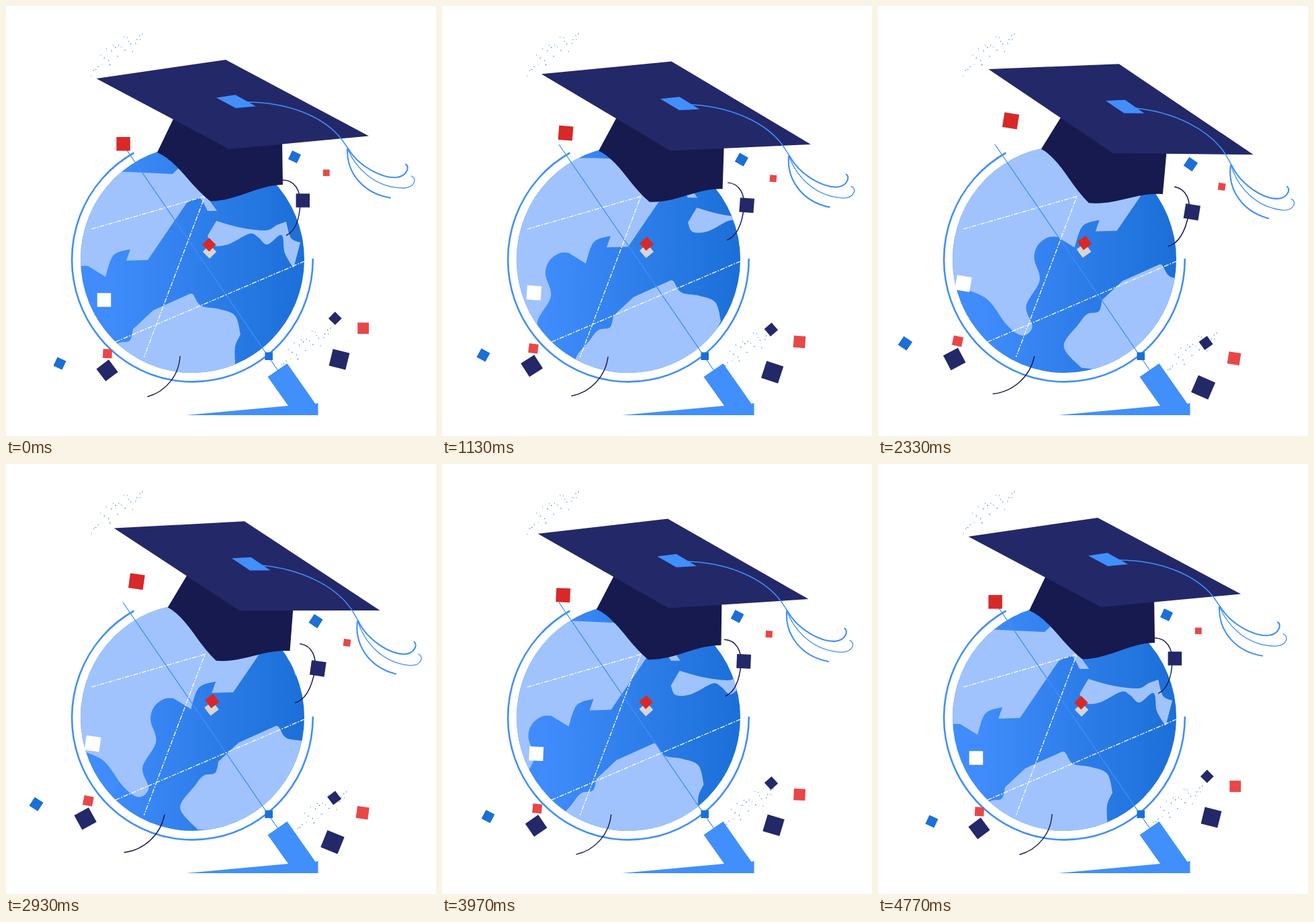
Animation, 640 px wide and 640 px high, one loop 4810 ms. Source, as an HTML page:

```html
<!DOCTYPE html>
<html lang="en">
<head>
<meta charset="utf-8">
<title>Globe with graduation cap</title>
<style>
  html, body { margin: 0; width: 100%; height: 100%; overflow: hidden; background: #fff; }
  svg { display: block; width: 100vw; height: 100vh; }
</style>
</head>
<body>
<svg viewBox="0 0 640 640" xmlns="http://www.w3.org/2000/svg">
  <defs>
    <linearGradient id="sea" gradientUnits="userSpaceOnUse" x1="150" y1="0" x2="444" y2="0">
      <stop offset="0" stop-color="#408cfc"/>
      <stop offset="1" stop-color="#1b6fd7"/>
    </linearGradient>
    <clipPath id="ball"><ellipse cx="277.5" cy="377.3" rx="166.5" ry="168.8"/></clipPath>
  </defs>

  <g id="specks" fill="#2a78dc"></g>

  <!-- globe -->
  <ellipse cx="277.5" cy="377.3" rx="166.5" ry="168.8" fill="url(#sea)"/>
  <g clip-path="url(#ball)"><g id="land" fill="#a0c3fd"></g></g>

  <!-- stand -->
  <path d="M190.5 218.5A179.3 181.8 0 1 0 456.7 376" fill="none" stroke="#418ffb" stroke-width="2.6"/>
  <path d="M389.5 552L418.5 532L460.5 592L464.5 591V609H268L420 595Z" fill="#418ffb"/>
  <path d="M174 206L405 543" stroke="#418ffb" stroke-width="1.3"/>
  <rect x="385.4" y="515.4" width="11.6" height="11.6" fill="#1b6fd7"/>
  <path d="M127 332L296 283.3L205.5 522.5M163 500L444 380" fill="none" stroke="#fff"
    stroke-width="1.3" stroke-dasharray="7 2 2 2"/>

  <g id="drift" fill="#2a78dc"></g>

  <!-- cap -->
  <g id="cap">
    <path d="M251 164L225 218Q243 225 267 253Q288 278 304 290.5C345 290 372 267 412 266L411 200Z" fill="#161a4e"/>
    <path d="M134.5 108L327 80L540 193.5L332 213Z" fill="#232869"/>
    <path d="M313 136.5L341.5 132.2L372 149.2L342 152Z" fill="#418ffb"/>
    <g fill="none" stroke="#418ffb" stroke-linecap="round">
      <path d="M350 143C418 141 474 165 500 199L509 212" stroke-width="1.5"/>
      <path d="M508 213C507 249 532 279 572 285.5" stroke-width="2.1"/>
      <path d="M509 212C525 239 560 257 582 255C597 253 601 239 595 235.5" stroke-width="2.1"/>
      <path d="M508 212C520 240 548 271 592 271C609 270 612 256 603 253" stroke-width="1.3"/>
    </g>
  </g>

  <g id="confetti">
    <g fill="none" stroke="#161a4e" stroke-width="1.4">
      <path d="M412 259C430 259 438 275 438 293C437 316 431 335 417 341.5"/>
      <path d="M259 521A66 66 0 0 1 210.5 581.5"/>
    </g>
  </g>
</svg>
<script>
const LOOP = 4810;
const DRIFT_PEAK = 2925;
const NAVY = '#232869', BLUE = '#1b6fd7', RED = '#d92828', CORAL = '#e94747';
const $ = id => document.getElementById(id);

function add(parent, tag, attrs) {
  const el = document.createElementNS('http://www.w3.org/2000/svg', tag);
  for (const k in attrs) el.setAttribute(k, attrs[k]);
  $(parent).appendChild(el);
}

// Smooth curve through points written as 'x,y x,y ...'
function curve(run) {
  const pts = run.split(' ').map(s => s.split(',').map(Number));
  const at = i => pts[Math.max(0, Math.min(pts.length - 1, i))];
  let d = pts[0].join(' ');
  for (let i = 1; i < pts.length; i++) {
    const [a, b, c, e] = [at(i - 2), at(i - 1), at(i), at(i + 1)];
    const c1 = b.map((v, k) => v + (c[k] - a[k]) / 6);
    const c2 = c.map((v, k) => v - (e[k] - b[k]) / 6);
    d += 'C' + [...c1, ...c2, ...c].join(' ');
  }
  return d;
}

// Smooth runs joined by sharp corners
const shore = (...runs) => add('land', 'path', { d: 'M' + runs.map(curve).join('L') + 'Z' });

shore('-90,246', '160,246', '248,250', '300,200', '320,250', '304,291', '314,305',
  '300,305 288,286 269,293', '211,378', '179,379', '185,362 160,371 148,403',
  '122,387 108,388 93,400 88,420 96,452 76,490 85,521 70,534 47,518 18,480 -20,463', '-90,440');
shore('158,582 132,550 154,517 167,502 184,498 189,481', '189,481 203,468 219,453',
  '270,430 278,429 290,446 317,451 341,461 349,489', '349,489 341,507 341,530', '341,600');
shore('313,320', '300,342 307,356 330,355 362,339 375,344 389,355 410,341 415,368 428,390',
  '438,352 424,345 417,321', '417,321 403,326 387,334 350,330 313,320');

// Squares of one kind, placed at each [x, y]
function squares(fill, size, turn, ...spots) {
  for (const [x, y] of spots) add('confetti', 'rect', {
    x: -size / 2, y: -size / 2, width: size, height: size, fill,
    transform: `translate(${x} ${y}) rotate(${turn})`
  });
}

squares('#d6d6d6', 14.4, 45, [303, 365.8]);
squares(RED, 14.4, 45, [302.3, 355.2]);
squares(RED, 20.5, 0, [174.6, 205.2]);
squares('#fff', 20.5, 0, [146, 437.5]);
squares(NAVY, 20.5, 0, [441.8, 289.5]);
squares(NAVY, 14, 45, [489.8, 464.9]);
squares(NAVY, 25.5, 14, [496, 526]);
squares(NAVY, 23, -37, [150.6, 542.4]);
squares(BLUE, 14.3, 25, [429.5, 224.6], [80, 532]);
squares(CORAL, 9.8, 0, [476.8, 248.3]);
squares(CORAL, 16.8, 0, [531.7, 479.7]);
squares(CORAL, 13.5, 3, [151, 517.3]);

// Two equal sprays of dots along a rising diagonal
let seed = 7;
const rand = () => (seed = seed * 16807 % 2147483647) / 2147483647;
const DOTS = 27;
for (let i = 0; i < DOTS; i++) {
  const u = (i + rand()) / DOTS;
  const dot = { cx: 127 + 78 * u, cy: 90 - 46 * u + 34 * (rand() - 0.5), r: 0.5 + 0.35 * rand() };
  add('specks', 'circle', dot);
  add('drift', 'circle', dot);
}

const ease = u => u * u * (3 - 2 * u);

// 0 at the loop ends, 1 at the peak
const swing = (t, peak) => ease(t < peak ? t / peak : (LOOP - t) / (LOOP - peak));

const move = (id, value) => $(id).setAttribute('transform', value);

function draw(t) {
  const p = swing(t, LOOP / 2);
  const d = swing(t, DRIFT_PEAK);
  move('land', `translate(${145 * p} ${-43.5 * p})`);
  move('cap', `rotate(${6 * p} 283 386.7)`);
  move('confetti', `translate(306.4 386.8) rotate(${9.25 * p}) scale(${1 + 0.078 * p}) translate(-306.4 -386.8)`);
  move('drift', `translate(${279.7 + 24 * d} ${438 + 8.5 * d})`);
}

function tick() {
  draw(performance.now() % LOOP);
  requestAnimationFrame(tick);
}
tick();
</script>
</body>
</html>
```
